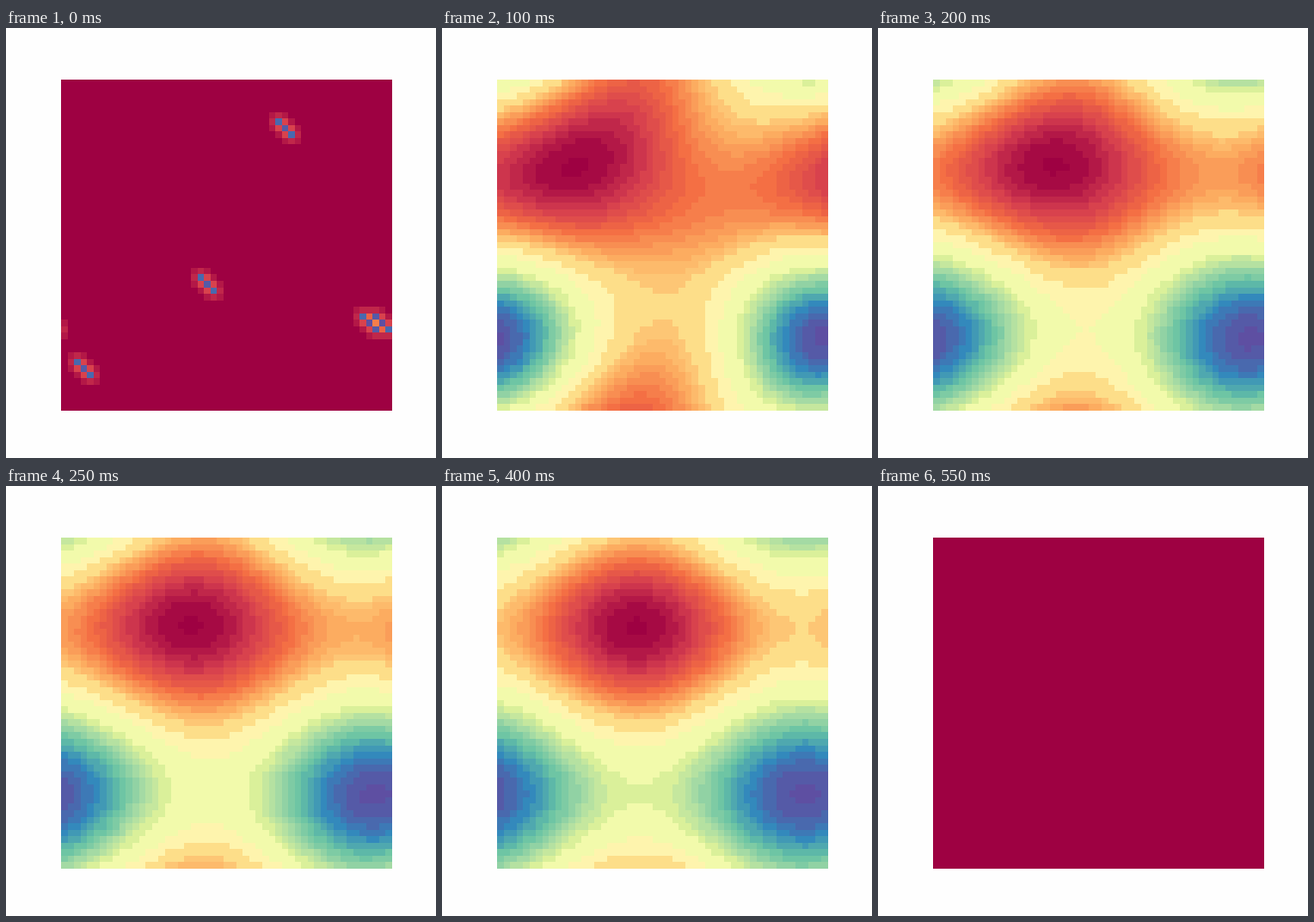
A matplotlib script that plays this animation: 500 by 500 pixels, repeating every 2550 ms.

```python
import numpy as np
import matplotlib.pyplot as plt
from matplotlib.animation import FuncAnimation
from matplotlib.colors import BoundaryNorm, ListedColormap

N = 51                      # cells per side, periodic
FRAMES, INTERVAL = 51, 50
ACTIVE = 11                 # frames before the field goes flat
STEPS = 350                 # diffusion steps per frame
EDGE, CORNER = 0.0465, 0.02325
SEEDS = [(7, 34), (31, 22), (44, 3), (37, 47), (37, 49)]


def seed_field():
    u = np.zeros((N, N))
    for r, c in SEEDS:
        for d in (-1, 0, 1):
            u[(r + d) % N, (c + d) % N] = 1
    return u


# One diffusion step is a 3x3 kernel, so n steps are a power of its transform.
cos_k = np.cos(2 * np.pi * np.fft.fftfreq(N))
cx, cy = np.meshgrid(cos_k, cos_k)
GAIN = 1 - 4 * (EDGE + CORNER) + 2 * EDGE * (cx + cy) + 4 * CORNER * cx * cy
SPECTRUM = np.fft.fft2(seed_field())


def field(i):
    if i >= ACTIVE:
        return np.zeros((N, N))
    u = np.fft.ifft2(SPECTRUM * GAIN ** (1 + STEPS * i)).real
    u -= u.min()
    return u / u.max()


def banded_cmap():
    edges = np.concatenate([
        [0], np.linspace(0.004, 0.36, 16), [0.43, 0.5, 0.601],
        np.linspace(0.64, 0.992, 14), [1.001]])
    mids = (edges[:-1] + edges[1:]) / 2
    colors = plt.get_cmap("Spectral")(mids)
    return ListedColormap(colors), BoundaryNorm(edges, len(mids))


fig = plt.figure(figsize=(5, 5), dpi=100, facecolor="#fefefe")
ax = fig.add_axes([0.1275, 0.11, 0.77, 0.77])
ax.axis("off")
cmap, norm = banded_cmap()
image = ax.imshow(field(0), cmap=cmap, norm=norm, interpolation="nearest")


def update(i):
    image.set_data(field(i))
    return [image]


anim = FuncAnimation(fig, update, frames=FRAMES, interval=INTERVAL,
                     repeat=True, repeat_delay=0)
plt.show()
```
